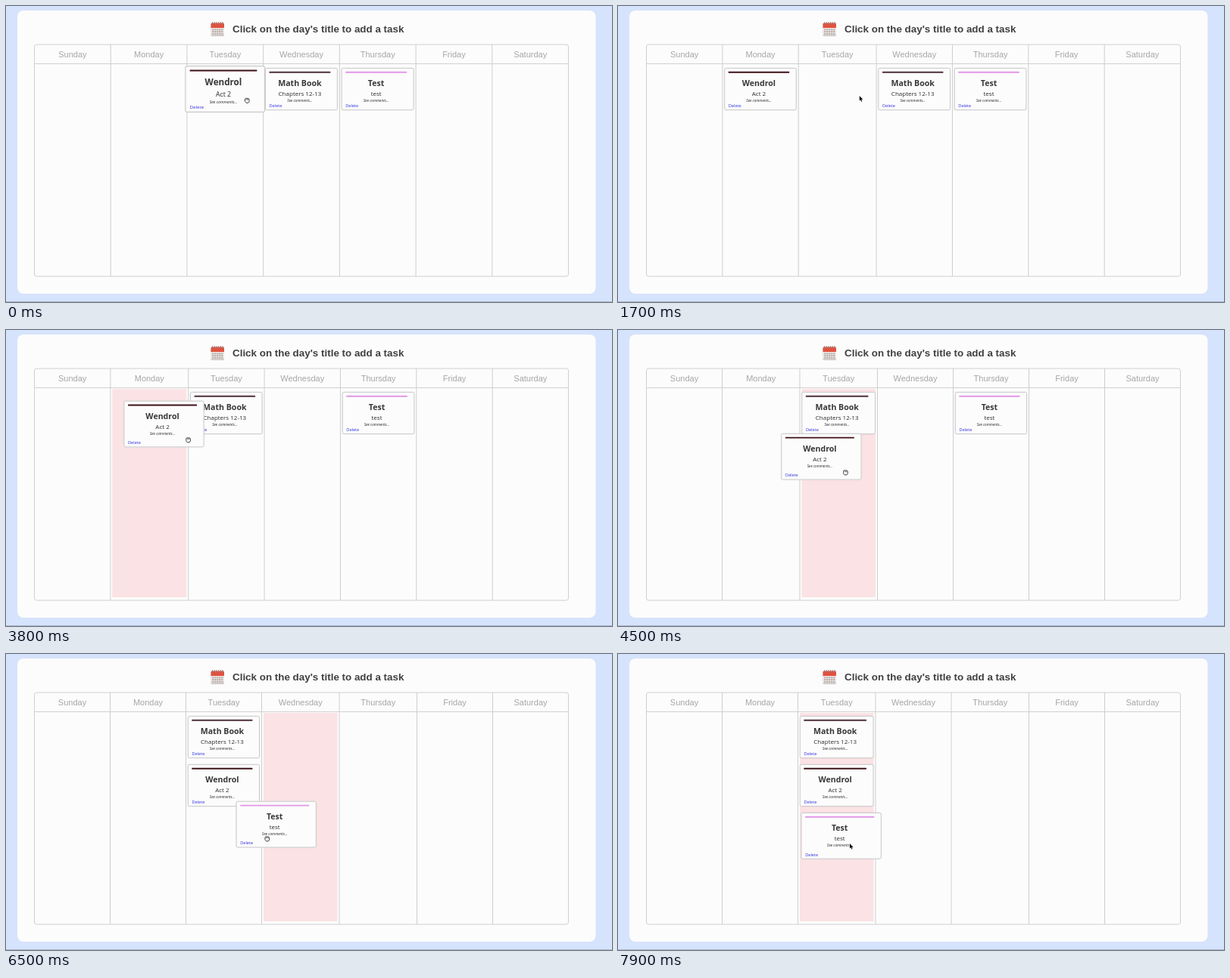
An HTML page with a canvas that plays this animation: 800x392 px, repeating every 8000 ms.

```html
<!DOCTYPE html>
<html lang="en">
<head>
<meta charset="utf-8">
<title>Weekly planner</title>
<style>
  html, body { margin: 0; width: 100%; height: 100%; overflow: hidden; background: #d6e3fc; }
  canvas { display: block; width: 800px; height: 392px; }
</style>
</head>
<body>
<canvas id="stage"></canvas>
<script>
const W = 800, H = 392, LOOP = 8000, STEP = 100;
const HOVER = 200, REST = 200, DROP = 500, LINGER = 150;
const canvas = document.getElementById('stage');
const ctx = canvas.getContext('2d');
const ratio = window.devicePixelRatio || 1;
canvas.width = W * ratio;
canvas.height = H * ratio;

const SANS = '"Liberation Sans", Arial, sans-serif';
const HAND = '"Open Sans", "Noto Sans", sans-serif';
const DAYS = ['Sunday', 'Monday', 'Tuesday', 'Wednesday', 'Thursday', 'Friday', 'Saturday'];
const TABLE = { x: 37.5, y: 51, w: 705, h: 307, head: 26 };
const UNIT = TABLE.w / DAYS.length;
const CARD_H = 56, LIFT = { w: 106, h: 61.5 };

const play = { title: 'Wendrol', sub: 'Act 2', bar: '#3c1117', start: { col: 2, row: 0 } };
const math = { title: 'Math Book', sub: 'Chapters 12-13', bar: '#4e2f38', start: { col: 3, row: 0 } };
const test = { title: 'Test', sub: 'test', bar: '#e296e6', start: { col: 4, row: 0 } };
const cards = [play, math, test];

// grip: pointer inside the lifted card; end: pointer at release; pull: how sharply the drag eases out
const drags = [
  { card: play, to: 1, lift: 500, release: 1050, grip: [82, 46], end: [223, 130], pull: 1.3 },
  { card: math, to: 2, lift: 2200, release: 2700, grip: [49, 39], end: [300, 121], pull: 1.3 },
  { card: play, to: 2, lift: 3600, release: 5100, grip: [85, 52], end: [331, 211], pull: 1.4 },
  { card: test, to: 2, lift: 6200, release: 7500, grip: [41, 50], end: [326, 261], pull: 8 }
];
const lastStop = [308, 255];

const mix = (a, b, u) => a + (b - a) * u;
const mixPoint = (a, b, u) => [mix(a[0], b[0], u), mix(a[1], b[1], u)];
const easeOut = (u, power) => 1 - (1 - u) ** power;
const clamp = u => Math.min(1, Math.max(0, u));

function columnEdges(wide = []) {
  const unit = TABLE.w / (DAYS.length + 0.025 * wide.length);
  const edges = [TABLE.x];
  DAYS.forEach((_, i) => edges.push(edges[i] + unit * (wide.includes(i) ? 1.025 : 1)));
  return edges;
}

function slotBox(edges, { col, row }) {
  return { x: edges[col] + 2.4, y: 82 + 64 * row, w: edges[col + 1] - edges[col] - 5, h: CARD_H };
}

// Replay the moves once to find each drag's start, grab point and landing slot.
function planDrags() {
  const place = new Map(cards.map(c => [c, c.start]));
  for (const d of drags) {
    d.from = place.get(d.card);
    d.settle = d.release + DROP;
    const { x, y, w, h } = slotBox(columnEdges(), d.from);
    d.grab = [x + (w - LIFT.w) / 2 + d.grip[0], y + (h - LIFT.h) / 2 + d.grip[1]];
    const row = cards.filter(c => c !== d.card && place.get(c).col === d.to).length;
    d.goal = { col: d.to, row };
    place.set(d.card, d.goal);
  }
}

function placeOf(card, t) {
  const done = drags.filter(d => d.card === card && d.settle <= t).pop();
  return done ? done.goal : card.start;
}

// Held along each drag, at rest after release, then gliding to the next card.
function pointerAt(t) {
  const i = drags.findLastIndex(d => d.lift <= t);
  if (i < 0) return drags[0].grab;
  const d = drags[i], next = drags[i + 1];
  if (t < d.release) return mixPoint(d.grab, d.end, easeOut((t - d.lift) / (d.release - d.lift), d.pull));
  const leave = d.release + REST;
  const arrive = (next ? next.lift : LOOP + STEP) - HOVER;
  return mixPoint(d.end, next ? next.grab : lastStop, clamp((t - leave) / (arrive - leave)));
}

function columnUnder(d, t) {
  const x = pointerAt(Math.min(t, d.release - 1))[0] - d.grip[0] + LIFT.w / 2;
  return Math.floor((x - TABLE.x) / UNIT);
}

function dragBox(d, t, edges) {
  const held = pointerAt(Math.min(t, d.release));
  const goal = slotBox(edges, d.goal);
  const u = easeOut(clamp((t - d.release) / DROP), 2);
  const [x, y] = mixPoint([held[0] - d.grip[0], held[1] - d.grip[1]], [goal.x, goal.y], u);
  return { x, y, ...LIFT };
}

function text(str, x, y, font, color, align = 'center') {
  ctx.font = font;
  ctx.fillStyle = color;
  ctx.textAlign = align;
  ctx.fillText(str, x, y);
}

function box(x, y, w, h, r, fill, stroke) {
  ctx.beginPath();
  ctx.roundRect(x, y, w, h, r);
  if (fill) { ctx.fillStyle = fill; ctx.fill(); }
  if (stroke) { ctx.strokeStyle = stroke; ctx.lineWidth = 1; ctx.stroke(); }
}

function line(x1, y1, x2, y2, color) {
  ctx.beginPath();
  ctx.moveTo(x1, y1);
  ctx.lineTo(x2, y2);
  ctx.strokeStyle = color;
  ctx.lineWidth = 1;
  ctx.stroke();
}

function drawCalendar() {
  box(270.5, 23, 17.5, 17, 1.5, '#c9c4c2');
  box(270.5, 22.5, 17.5, 16, 1.5, '#efebe8');
  box(270.5, 22.5, 17.5, 6.5, [1.5, 1.5, 0, 0], '#e0523f');
  for (let i = 0; i < 6; i++) box(272 + i * 2.7, 21, 1, 3.5, 0.5, '#9a7772');
  for (let r = 0; r < 3; r++)
    for (let c = 0; c < 5; c++) box(272.2 + c * 3, 30.3 + r * 2.8, 2.2, 2, 0, '#b5aaa6');
}

function drawBoard(edges, active) {
  ctx.fillStyle = '#d6e3fc';
  ctx.fillRect(0, 0, W, H);
  ctx.fillStyle = '#aeb9cc';
  ctx.fillRect(0, 391, W, 1);
  box(15, 6, 763.5, 375, 8, '#fcfcfc');
  drawCalendar();
  text("Click on the day's title to add a task", 299, 35, `bold 13.4px ${SANS}`, '#404042', 'left');

  if (active >= 0) {
    const x = edges[active] + 2.5;
    box(x, 78, edges[active + 1] - 2.5 - x, 276, 0, '#fbe2e4');
  }
  const { x, y, w, h, head } = TABLE;
  box(x, y, w, h, 3, null, '#d0d0d0');
  line(x, y + head - 0.5, x + w, y + head - 0.5, '#d0d0d0');
  DAYS.forEach((day, i) => {
    if (i) line(edges[i], y, edges[i], y + h, '#cecece');
    text(day, (edges[i] + edges[i + 1]) / 2, 67.5, `11px ${SANS}`, '#a6a6a6');
  });
}

function drawCard(card, { x, y, w, h }, scale = 1) {
  ctx.save();
  ctx.translate(x + w / 2, y + h / 2);
  ctx.scale(scale, scale);
  ctx.translate(-w / 2, -h / 2);
  ctx.shadowColor = 'rgba(0,0,0,.12)';
  ctx.shadowBlur = 1.5 * ratio;
  box(0, 0, w, h, 2, '#fcfcfc');
  ctx.shadowColor = 'transparent';
  box(0.4, 0.4, w - 0.8, h - 0.8, 2, null, '#cacaca');
  const mid = 5.5 + (w - 15) / 2;
  box(5.5, 4.8, w - 15, 1.9, 0.5, card.bar);
  text(card.title, mid, 23.8, `bold 10.6px ${HAND}`, '#38383a');
  text(card.sub, mid, 37.3, `8px ${HAND}`, '#2c2c2e');
  text('See comments...', mid, 45, `italic 4.7px ${HAND}`, '#222');
  text('Delete', 5.5, h - 4, `5.6px ${HAND}`, '#3434e2', 'left');
  ctx.restore();
}

const arrow = new Path2D('M0 0V6.6L1.5 5.3 2.5 7.7 3.6 7.2 2.6 4.9H4.7Z');
const fist = new Path2D('M-2.8-.4C-3.2-3.4-.6-3.4 0-2.8 1.6-3.4 3.2-2.6 2.9 0 2.9 2 2 3 1.4 3H-1.2C-2 2-3.2 1-2.8-.4Z');

function drawPointer([x, y], holding) {
  ctx.save();
  ctx.translate(x, y);
  ctx.lineJoin = 'round';
  if (holding) {
    ctx.fillStyle = '#fff';
    ctx.strokeStyle = '#222';
    ctx.lineWidth = 0.9;
    ctx.fill(fist);
    ctx.stroke(fist);
    for (const fx of [-1.3, 0.1, 1.5]) line(fx, -2.4, fx, -0.6, 'rgba(30,30,30,.6)');
  } else {
    ctx.translate(-2, -4);
    ctx.strokeStyle = '#fff';
    ctx.lineWidth = 1;
    ctx.stroke(arrow);
    ctx.fillStyle = '#111';
    ctx.fill(arrow);
  }
  ctx.restore();
}

function render(t) {
  ctx.setTransform(ratio, 0, 0, ratio, 0, 0);
  const drag = drags.find((d, i) => t < d.settle && (i === 0 || t >= d.lift - HOVER));
  const lifted = drag && t >= drag.lift;
  const lately = drags.find(d => t >= d.settle && t <= d.settle + LINGER);
  const active = lifted ? columnUnder(drag, t) : -1;
  const wide = lifted ? [...new Set([drag.from.col, active])] : lately ? [lately.from.col] : [];
  const edges = columnEdges(wide);
  drawBoard(edges, active);

  const home = card => slotBox(edges, placeOf(card, t));
  for (const card of cards) if (card !== drag?.card) drawCard(card, home(card));
  if (lifted) drawCard(drag.card, dragBox(drag, t, edges));
  else if (drag) drawCard(drag.card, home(drag.card), 1.1);
  drawPointer(pointerAt(t), drag && t < drag.release);
}

planDrags();
const start = performance.now();
function tick() {
  const t = (performance.now() - start) % LOOP;
  render(Math.floor(t / STEP) * STEP);
  requestAnimationFrame(tick);
}
tick();
</script>
</body>
</html>
```
